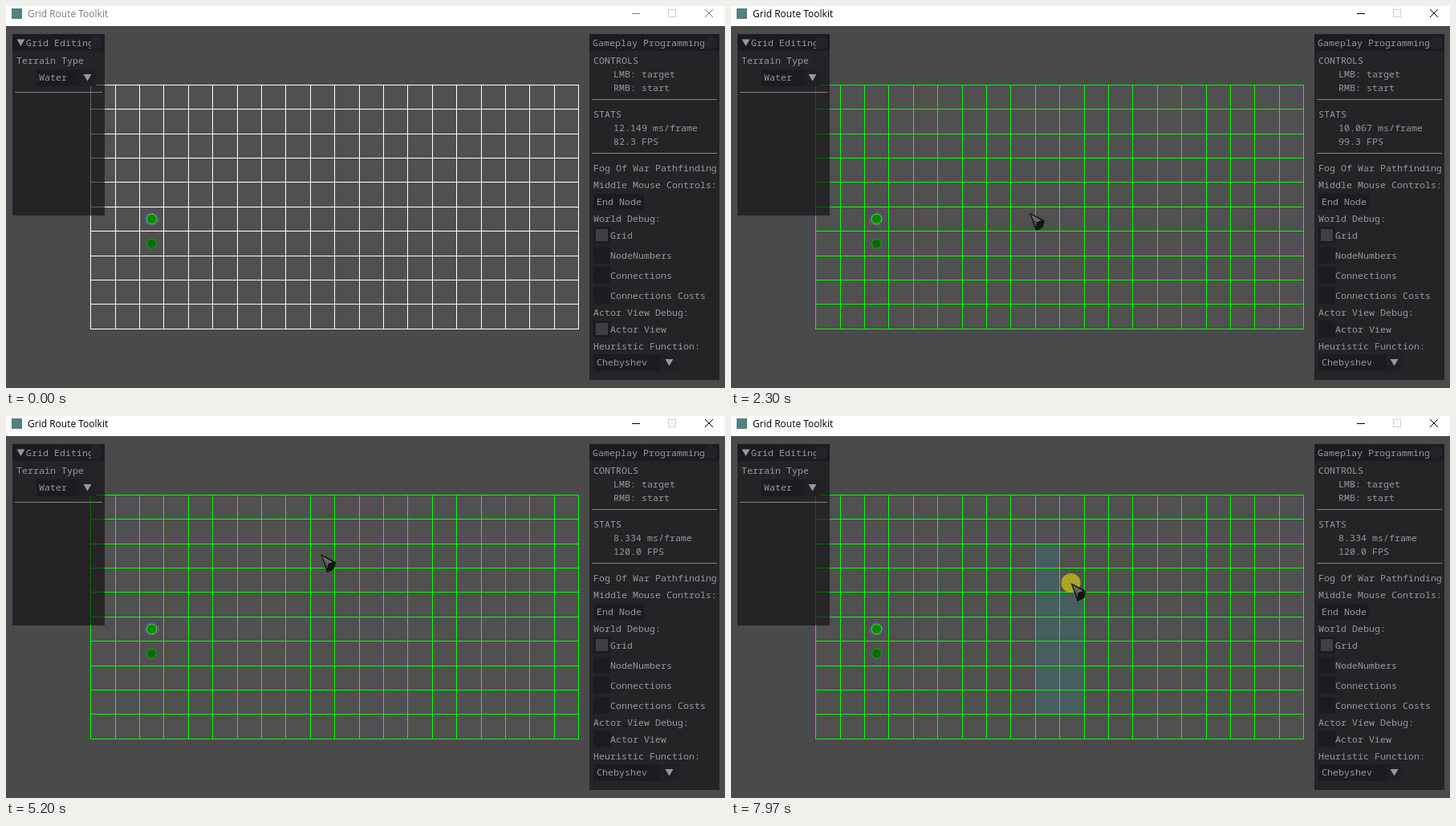
An HTML page with a canvas that plays this animation: 896 by 476 pixels, repeating every 8000 ms.

```html
<!DOCTYPE html>
<html lang="en">
<head>
<meta charset="utf-8">
<title>Grid Route Toolkit</title>
<style>
  html, body { margin: 0; width: 100%; height: 100%; overflow: hidden; background: #4a4a4a; }
  canvas { display: block; width: 896px; height: 476px; }
</style>
</head>
<body>
<canvas id="stage" width="896" height="476"></canvas>
<script>
const ctx = document.getElementById('stage').getContext('2d');
const LOOP = 8000, STEP = 64;
const CELL = 30.4, GRID_X = 105.6, GRID_Y = 98.2, COLS = 20, ROWS = 10;
const FOCUS_AT = 640, TOGGLE_AT = 1770, PAINT_FROM = 5330, PAINT_LAG = 75;
const TEXT = '#98989c', FRAME = '#1d1b22', MARK = '#3f3e46', LINE = '#838383';

// Pointer stops; it eases from one to the next
const STOPS = [
  { t: 250, x: 766, y: 480 },
  { t: 870, x: 751, y: 399 },
  { t: TOGGLE_AT, x: 741, y: 409 },
  { t: 2330, x: 369, y: 256 },
  { t: 4180, x: 398, y: 176 },
  { t: 5300, x: 392, y: 172 },
  { t: 6350, x: 388, y: 352 },
  { t: 6950, x: 424, y: 350 },
  { t: 7260, x: 425, y: 283 },
  { t: 7500, x: 425, y: 283 },
  { t: 8200, x: 423, y: 183 }
];

const ease = k => k * k * (3 - 2 * k);

function pointerAt(t) {
  const next = Math.max(1, STOPS.findIndex(stop => stop.t > t));
  const a = STOPS[next - 1], b = STOPS[next];
  const k = ease(Math.max(0, (t - a.t) / (b.t - a.t)));
  return { x: a.x + (b.x - a.x) * k, y: a.y + (b.y - a.y) * k };
}

const isPressed = t => t >= PAINT_FROM || Math.abs(t - TOGGLE_AT + 40) < 40 || Math.abs(t - FOCUS_AT) < 50;

const gridX = i => Math.floor(GRID_X + CELL * i);
const gridY = j => Math.floor(GRID_Y + CELL * j);

// Each cell turns to water shortly after the pressed pointer first enters it
const water = new Map();
for (let t = PAINT_FROM; t < LOOP; t += 5) {
  const { x, y } = pointerAt(t);
  const col = Math.floor((x - GRID_X) / CELL), row = Math.floor((y - GRID_Y) / CELL);
  const key = col + ',' + row;
  if (!water.has(key)) water.set(key, { col, row, at: t + PAINT_LAG });
}

// Rolling average: creeps up, then falls to the display rate once the view is off
function frameTime(t) {
  const ms = 12.149 + 0.00024 * Math.min(t, TOGGLE_AT - 30) - 0.004455 * Math.max(0, t - TOGGLE_AT + 30);
  const jitter = Math.abs(Math.sin(Math.floor(t / STEP) * 12.9)) * 0.0015;
  return Math.max(8.333 + jitter, ms);
}

function rect(x, y, w, h, color) {
  ctx.fillStyle = color;
  ctx.fillRect(x, y, w, h);
}

function poly(points, color) {
  ctx.beginPath();
  points.forEach(([x, y]) => ctx.lineTo(x, y));
  ctx.closePath();
  ctx.fillStyle = color;
  ctx.fill();
}

function disc(x, y, r, color) {
  ctx.beginPath();
  ctx.arc(x, y, r, 0, 7);
  ctx.fillStyle = color;
  ctx.fill();
}

function ring(x, y, r, color, from = 0, to = Math.PI * 2) {
  ctx.beginPath();
  ctx.arc(x, y, r, from, to);
  ctx.strokeStyle = color;
  ctx.lineWidth = 1;
  ctx.stroke();
}

function arrowDown(x, y) {
  poly([[x - 5, y - 4], [x + 5, y - 4], [x, y + 4.5]], TEXT);
}

function label(text, x, middle) {
  ctx.font = '11.667px "Noto Sans Mono", monospace';
  ctx.fillStyle = TEXT;
  ctx.fillText(text, x, middle + 4);
}

function titleBar(active) {
  const color = active ? '#000' : '#7d7d7d';
  rect(0, 0, 896, 25, '#fff');
  rect(7, 3, 13, 13, '#557f80');
  ctx.font = '12px "Open Sans", sans-serif';
  ctx.fillStyle = color;
  ctx.fillText('Grid Route Toolkit', 27, 14);
  rect(780, 9, 10, 1, color);
  ctx.lineWidth = 1;
  ctx.strokeStyle = '#cfcfcf';
  ctx.strokeRect(825.5, 4.5, 9, 9);
  ctx.strokeStyle = color;
  ctx.beginPath();
  ctx.moveTo(871, 4); ctx.lineTo(881, 14);
  ctx.moveTo(881, 4); ctx.lineTo(871, 14);
  ctx.stroke();
}

function grid(t) {
  const left = gridX(0), top = gridY(0);
  const width = gridX(COLS) - left + 1, height = gridY(ROWS) - top + 1;
  const color = t < TOGGLE_AT ? '#fff' : '#0f0';
  rect(left, top, width, height, '#505050');
  for (const { col, row, at } of water.values()) {
    if (t < at) continue;
    const x = gridX(col), y = gridY(row);
    rect(x, y, gridX(col + 1) - x, gridY(row + 1) - y, '#465e5d');
  }
  for (let i = 0; i <= COLS; i++) rect(gridX(i), top, 1, height, color);
  for (let j = 0; j <= ROWS; j++) rect(left, gridY(j), width, 1, color);
}

function agent(t) {
  const turn = Math.floor(t / STEP) * 2.4;
  ring(181.5, 265.5, 9, '#4a48b8');
  ring(181.5, 265.5, 9, '#77706a', turn, turn + 0.8);
  ring(181.5, 265.5, 7.6, '#7a5a3a');
  disc(181.5, 265.5, 6, '#008c00');
  ring(181.5, 265.5, 6.3, '#4ce044');
  disc(181.5, 296, 6, '#0a690a');
  ring(181.5, 296, 6, '#00b414');
}

function panel(x, y, w, h) {
  rect(x, y, w, h, 'rgba(16,14,18,.63)');
  rect(x, y, w, 21, FRAME);
  disc(x + w - 10.5, y + 10.5, 8.5, '#24222a');
}

function combo(text, x, y, w, inset) {
  rect(x, y, w, 21, FRAME);
  rect(x + w - 21, y, 21, 21, '#222027');
  label(text, x + inset, y + 10);
  arrowDown(x + w - 10.5, y + 10);
}

function checkbox(text, y, checked, hovered) {
  rect(732, y - 11, 21, 21, hovered ? '#302f36' : FRAME);
  if (checked) rect(735, y - 8, 15, 15, hovered ? '#53525c' : MARK);
  label(text, 753, y);
}

function editorPanel() {
  panel(8, 35, 115, 226);
  arrowDown(18.5, 45.5);
  ctx.save();
  ctx.beginPath();
  ctx.rect(8, 35, 98, 21);
  ctx.clip();
  label('Grid Editing', 25, 46);
  ctx.restore();
  label('Terrain Type', 13, 68);
  combo('Water', 38, 79, 74, 3);
  rect(11, 107, 109, 1, LINE);
}

function controlPanel(t) {
  const ms = frameTime(t);
  panel(727, 35, 162, 431);
  label('Gameplay Programming', 731, 46);
  label('CONTROLS', 732, 68);
  label('LMB: target', 757, 85);
  label('RMB: start', 757, 102);
  rect(730, 116, 156, 1, LINE);
  label('STATS', 732, 135);
  label(ms.toFixed(3) + ' ms/frame', 757, 152);
  label((1000 / ms).toFixed(1) + ' FPS', 757, 169);
  rect(730, 183, 156, 1, LINE);
  label('Fog Of War Pathfinding', 732, 202);
  label('Middle Mouse Controls:', 732, 223);
  rect(732, 234, 63, 20, FRAME);
  label('End Node', 736, 244);
  label('World Debug:', 732, 265);
  ['Grid', 'NodeNumbers', 'Connections', 'Connections Costs']
    .forEach((name, i) => checkbox(name, 286 + 25 * i, i === 0));
  label('Actor View Debug:', 732, 382);
  checkbox('Actor View', 403, t < TOGGLE_AT, t > FOCUS_AT && t < TOGGLE_AT + 60);
  label('Heuristic Function:', 732, 424);
  combo('Chebyshev', 732, 434, 105, 4);
}

function pointer(t) {
  if (t < STOPS[0].t) return;
  const { x, y } = pointerAt(t);
  if (isPressed(t)) disc(x, y, 12, 'rgba(205,198,18,.72)');
  ctx.save();
  ctx.translate(x, y);
  poly([[0, 0], [19, 10], [17, 18], [13, 21], [8, 23]], '#141414');
  poly([[2, 2.5], [15, 10], [9, 12], [8, 18]], '#6b6b6b');
  poly([[4, 6], [8, 11], [8, 17]], '#484848');
  ctx.restore();
}

function draw(t) {
  rect(0, 0, 896, 476, '#4a4a4a');
  titleBar(t >= FOCUS_AT);
  grid(t);
  agent(t);
  editorPanel();
  controlPanel(t);
  pointer(t);
}

const start = performance.now();
function tick() {
  draw((performance.now() - start) % LOOP);
  requestAnimationFrame(tick);
}
tick();
</script>
</body>
</html>
```
